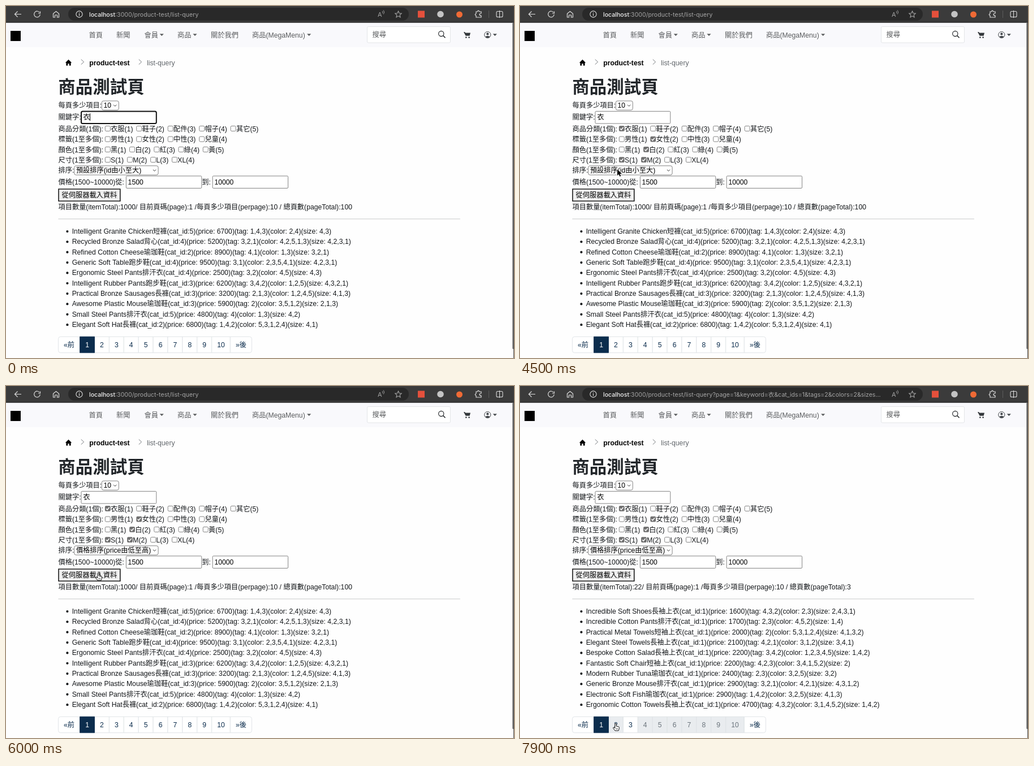
An HTML page with a canvas that plays this animation: 898x623 px, repeating every 8 s.

```html
<!DOCTYPE html>
<html lang="zh-Hant">
<head>
<meta charset="utf-8">
<title>商品測試頁</title>
<style>
html, body { margin: 0; width: 100%; height: 100%; overflow: hidden; background: #fefefe; }
canvas { display: block; width: 898px; height: 623px; }
</style>
</head>
<body>
<canvas id="stage" width="898" height="623"></canvas>
<script>
const stage = document.getElementById('stage').getContext('2d');
const layer = new OffscreenCanvas(898, 623).getContext('2d');
let c = stage;
const LOOP = 8000, STEP = 100, EM = 12.23;
const SANS = '"Liberation Sans", "Noto Sans CJK TC", "Noto Sans CJK", sans-serif';
const UI = 'Inter, "Noto Sans CJK TC", "Noto Sans CJK", sans-serif';
const INK = '#14171a', NAVY = '#0c2d4d', GREY = '#767676';

// name | category | price | tags | colours | sizes
const ALL = [
  'Intelligent Granite Chicken短褲|5|6700|1,4,3|2,4|4,3',
  'Recycled Bronze Salad背心|4|5200|3,2,1|4,2,5,1,3|4,2,3,1',
  'Refined Cotton Cheese瑜珈鞋|2|8900|4,1|1,3|3,2,1',
  'Generic Soft Table跑步鞋|4|9500|3,1|2,3,5,4,1|4,2,3,1',
  'Ergonomic Steel Pants排汗衣|4|2500|3,2|4,5|4,3',
  'Intelligent Rubber Pants跑步鞋|3|6200|3,4,2|1,2,5|4,3,2,1',
  'Practical Bronze Sausages長褲|3|3200|2,1,3|1,2,4,5|4,1,3',
  'Awesome Plastic Mouse瑜珈鞋|3|5900|2|3,5,1,2|2,1,3',
  'Small Steel Pants排汗衣|5|4800|4|1,3|4,2',
  'Elegant Soft Hat長褲|2|6800|1,4,2|5,3,1,2,4|4,1'
];
const FOUND = [
  'Incredible Soft Shoes長袖上衣|1|1600|4,3,2|2,3|2,4,3,1',
  'Incredible Cotton Pants排汗衣|1|1700|2,3|4,5,2|1,4',
  'Practical Metal Towels短袖上衣|1|2000|2|5,3,1,2,4|4,1,3,2',
  'Elegant Steel Towels長袖上衣|1|2100|4,2,1|3,1,2|3,4,1',
  'Bespoke Cotton Salad長袖上衣|1|2200|3,4,2|1,2,3,4,5|1,4,2',
  'Fantastic Soft Chair短袖上衣|1|2200|4,2,3|3,4,1,5,2|2',
  'Modern Rubber Tuna瑜珈衣|1|2400|2,3|3,2,5|3,2',
  'Generic Bronze Mouse排汗衣|1|2900|3,2,1|4,2,1|4,3,1,2',
  'Electronic Soft Fish瑜珈衣|1|2900|1,4,2|3,2,5|4,1,3',
  'Ergonomic Cotton Towels長袖上衣|1|4700|4,3,2|3,1,4,5,2|1,4,2'
];

// label, centre y, options, index -> time it gets checked
const FILTERS = [
  ['商品分類(1個):', 217, ['衣服(1)', '鞋子(2)', '配件(3)', '帽子(4)', '其它(5)'], { 0: 1200 }],
  ['標籤(1至多個):', 235.7, ['男性(1)', '女性(2)', '中性(3)', '兒童(4)'], { 1: 2400 }],
  ['顏色(1至多個):', 254, ['黑(1)', '白(2)', '紅(3)', '綠(4)', '黃(5)'], { 1: 2700 }],
  ['尺寸(1至多個):', 272.2, ['S(1)', 'M(2)', 'L(3)', 'XL(4)'], { 0: 4100, 1: 3200 }]
];
const SORTS = ['預設排序(id由小至大)', 'ID排序(id由大至小)', '價格排序(price由低至高)', '價格排序(price由高至低)'];

// pointer track: time, x, y
const TRACK = [
  [300, 214, 199], [600, 200, 226], [1000, 178, 215], [1300, 178, 215],
  [1500, 203, 243], [1700, 208, 254], [2200, 226, 239], [2300, 232, 236], [2400, 232, 236],
  [2600, 223, 253], [2700, 223, 254], [2900, 228, 265], [3100, 221, 272], [3200, 219, 273],
  [3300, 219, 273], [3600, 183, 273], [3700, 183, 273], [3900, 176, 270], [4200, 176, 270],
  [4500, 172, 289], [4700, 172, 289], [5200, 169, 325], [5600, 168, 327], [6000, 163, 331],
  [6300, 163, 331], [6900, 209, 385], [7100, 209, 385], [7800, 169, 596], [7900, 169, 597]
];

function text(s, x, y, color = INK, size = EM, weight = 400, family = SANS, align = 'left') {
  c.font = `${weight} ${size}px ${family}`;
  c.textAlign = align;
  c.fillStyle = color;
  c.fillText(s, x, y + size * 0.36);
}

function width(s, size = EM) {
  c.font = `400 ${size}px ${SANS}`;
  return c.measureText(s).width;
}

function box(x, y, w, h, r, fill, stroke, line = 1) {
  c.beginPath();
  c.roundRect(x, y, w, h, r);
  if (fill) { c.fillStyle = fill; c.fill(); }
  if (stroke) { c.strokeStyle = stroke; c.lineWidth = line; c.stroke(); }
}

function rect(x, y, w, h, color) {
  c.fillStyle = color;
  c.fillRect(x, y, w, h);
}

function lines(color, w, ...paths) {
  c.strokeStyle = color;
  c.lineWidth = w;
  for (const p of paths) c.stroke(new Path2D(p));
}

function ring(x, y, r, color, w, from = 0, to = 7) {
  c.beginPath();
  c.arc(x, y, r, from, to);
  c.strokeStyle = color;
  c.lineWidth = w;
  c.stroke();
}

function dot(x, y, r, color) {
  c.beginPath();
  c.arc(x, y, r, 0, 7);
  c.fillStyle = color;
  c.fill();
}

function shape(d, fill) {
  c.fillStyle = fill;
  c.fill(new Path2D(d));
}

function at(x, y, draw) {
  c.save();
  c.translate(x, y);
  draw();
  c.restore();
}

// draws a group on its own layer, then blends it in as a whole
function fade(alpha, draw) {
  c = layer;
  c.clearRect(0, 0, 898, 623);
  c.save();
  draw();
  c.restore();
  c = stage;
  c.globalAlpha = alpha;
  c.drawImage(layer.canvas, 0, 0);
  c.globalAlpha = 1;
}

function star(r1, r2) {
  let d = '';
  for (let i = 0; i < 10; i++) {
    const a = i * Math.PI / 5 - Math.PI / 2, r = i % 2 ? r2 : r1;
    d += (i ? 'L' : 'M') + r * Math.cos(a) + ' ' + r * Math.sin(a);
  }
  return d + 'Z';
}

function browserBar(t) {
  const pale = '#dcdcdc', dim = '#a5a5a5';
  rect(0, 0, 898, 29.5, '#3b3b3b');
  rect(0, 28.4, 898, 1.1, '#282828');
  box(110, 3, 602, 23, 11.5, '#292929');
  lines(pale, 1.2, 'M27 14.5H15.5M20.5 9.5L15.5 14.5L20.5 19.5', 'M60.5 9.5V13H57',
    'M83.5 13.5L88.5 9.5L93.5 13.5V20H90.5V16H86.5V20H83.5Z');
  ring(55, 14.5, 5.3, pale, 1.2, 0.1, 5.6);
  ring(129.5, 14.5, 5.6, pale, 1.1);
  lines(pale, 1.2, 'M129.5 13.6V17.6M129.5 11.3V12.5');
  text('localhost', 147, 14.7, '#f2f2f2', 10.6, 500, UI);
  const x = 147 + c.measureText('localhost').width;
  const query = t >= 6400 ? '?page=1&keyword=衣&cat_ids=1&tags=2&colors=2&sizes...' : '';
  text(':3000/product-test/list-query' + query, x, 14.7, dim, 10.6, 400, UI);
  text('A', 657, 15, dim, 11, 400, UI);
  ring(663, 11, 3, dim, 0.9, -0.7, 0.7);
  ring(663, 11, 5.5, dim, 0.9, -0.7, 0.7);
  at(693.5, 15, () => lines(dim, 1.1, star(6, 2.8)));
  box(728, 8.5, 12, 12, 0, '#e5503c');
  dot(768, 14.5, 5.8, '#c4c4c4');
  dot(801.5, 15, 5.5, '#ef6a35');
  lines(pale, 1.2, 'M831 10H833.5Q834 7.5 836 8.5L836.5 10H840V13Q837 13 837 15Q837 17 840 17V20H831V17Q829 16.5 829.5 14.5L831 13.5Z');
  rect(853, 8, 1, 13, '#5c5c5c');
  box(867, 9.5, 11, 10, 2, null, pale, 1.1);
  lines(pale, 1.1, 'M872.5 8V21');
}

function caret(x, color = '#5a5c5e') {
  shape(`M${x - 3.6} 49.2H${x + 3.6}L${x} 53Z`, color);
}

function navBar(dx) {
  const grey = '#5a5c5e';
  rect(0, 29.5, 898, 43, '#f9f9fc');
  box(8, 44, 18, 18, 0, '#000');
  [['首頁', 146.5], ['新聞', 195], ['會員', 244.5], ['商品', 303], ['關於我們', 362], ['商品(MegaMenu)', 435]]
    .forEach(([s, x]) => text(s, x, 51.2, grey));
  [275.3, 334, 535.7].forEach(x => caret(x));
  at(dx, 0, () => {
    box(638.5, 36.5, 147, 28.5, 2, '#fff', '#e3e5e8');
    text('搜尋', 647.5, 50.5, grey);
    ring(769.3, 49, 4.6, INK, 1.1);
    lines(INK, 1.4, 'M772.7 52.4L776.5 56.2');
    shape('M809 46H811.2L812 47.5H821L819.6 52.8H812.6Z', '#33373b');
    dot(813.3, 55.6, 1.3, '#33373b');
    dot(818.6, 55.6, 1.3, '#33373b');
    ring(851.3, 51, 5.6, '#44484c', 1);
    dot(851.3, 49.4, 2.1, '#44484c');
    shape('M847 54.5Q851.3 50.8 855.6 54.5Q851.3 58.6 847 54.5Z', '#44484c');
    caret(864.3, '#44484c');
  });
}

function checkbox(x, y, on) {
  if (!on) return box(x + 0.4, y - 4.6, 9, 9, 1.8, '#fff', GREY, 0.9);
  box(x, y - 5, 9.8, 9.8, 2, '#707070');
  lines('#fff', 1.5, `M${x + 2.2} ${y + 0.1}L${x + 4.1} ${y + 2.1}L${x + 7.7} ${y - 2.3}`);
}

function select(x, y, w, label) {
  box(x, y - 8, w, 16.2, 3, '#fff', GREY, 0.9);
  text(label, x + 3.2, y, '#000', EM, 500);
  const m = x + w - 6.6;
  lines('#333', 1, `M${m - 2.6} ${y - 1.2}L${m} ${y + 1.4}L${m + 2.6} ${y - 1.2}`);
}

function input(x, y, w, value, focus) {
  if (focus) box(x, y - 10.6, w, 21.6, 2.5, '#fff', '#101010', 2);
  else box(x, y - 10.6, w, 21.6, 1.5, '#fff', GREY, 0.9);
  text(value, x + 3.2, y, '#000', EM, 500);
}

function form(t, loaded) {
  shape('M104.8 100.5L110.5 94.8L116.2 100.5H114.6V105.5H111.8V102H109.2V105.5H106.4V100.5Z', '#000');
  lines('#75797d', 1, 'M132.8 94.5L137.6 99L132.8 103.5', 'M234.8 94.5L239.6 99L234.8 103.5');
  text('product-test', 147.3, 100.3, '#000', EM, 700);
  text('list-query', 249, 100.3, '#62676c');
  text('商品測試頁', 92.3, 143, '#212529', 30.5, 600);

  text('每頁多少項目:', 92.5, 176);
  select(169.3, 176, 30, '10');
  text('關鍵字:', 92.5, 197);
  input(133, 197, 132.8, '衣', t < 1100);
  if (t < 300 || (t >= 800 && t < 1100)) rect(148, 190, 1, 13, '#000');

  for (const [label, y, options, checks] of FILTERS) {
    text(label, 92.5, y + 0.3);
    let x = 174.9;
    options.forEach((s, i) => {
      checkbox(x, y, t >= checks[i]);
      text(s, x + 10.2, y + 0.3);
      x += 16.1 + width(s);
    });
  }

  text('排序:', 92.5, 290.8);
  select(120.7, 290.8, 148.4, SORTS[t >= 5700 ? 2 : 0]);
  text('價格(1500~10000)從:', 92.5, 311.5);
  input(212.4, 311.5, 133.4, '1500');
  text('到:', 346.2, 311.5);
  input(365.2, 311.5, 133.4, '10000');
  box(93, 324, 108.8, 21.2, 0, '#efefef', '#1c1c1c', 1.6);
  text('從伺服器載入資料', 147.4, 334.5, '#000', EM, 500, SANS, 'center');

  const [total, pages] = loaded ? [22, 3] : [1000, 100];
  text(`項目數量(itemTotal):${total}/ 目前頁碼(page):1 /每頁多少項目(perpage):10 / 總頁數(pageTotal):${pages}`, 92.5, 355.4);
  rect(92.4, 376.4, 710.4, 1, '#c8cacb');
}

function list(rows) {
  rows.forEach((row, i) => {
    const [name, cat, price, tags, colors, sizes] = row.split('|');
    const y = 398.6 + i * 18.35;
    dot(108.4, y + 0.4, 2.1, INK);
    text(`${name}(cat_id:${cat})(price: ${price})(tag: ${tags})(color: ${colors})(size: ${sizes})`, 116.7, y);
  });
}

function pager(loaded, p) {
  let x = 92.5;
  const cells = ['«前', ...Array.from({ length: 10 }, (_, i) => String(i + 1)), '»後'].map((s, i) => {
    const cell = { s, i, x, w: width(s) + 19.1 };
    x += cell.w;
    return cell;
  });
  const paint = ({ s, i, x, w }, fill, color, border) => {
    const r = i === 0 ? [4, 0, 0, 4] : i === 11 ? [0, 4, 4, 0] : 0;
    box(x, 585.3, w, 28.4, r, fill, border, 0.9);
    text(s, x + w / 2, 599.7, color, EM, 400, SANS, 'center');
  };
  for (const cell of cells) {
    const off = loaded && cell.i > 3 && cell.i < 11;
    const hover = cell.i === 2 && p && p.y > 585 && p.x > cell.x && p.x < cell.x + cell.w;
    paint(cell, off || hover ? '#e9ecef' : '#fff', off ? '#6c757d' : NAVY, '#dee2e6');
  }
  paint(cells[1], NAVY, '#fff', NAVY);
}

function spinner(t) {
  const a = (t - 6100) / 750 * 2 * Math.PI;
  ring(104, 401.9, 10.7, NAVY, 3.06, a + Math.PI / 4, a + Math.PI * 7 / 4);
}

function footer() {
  rect(0, 595.5, 898, 28, '#f9f9fc');
  text('台灣 © 2023 Talvok, Inc. 版權所有', 93, 616.8, '#5a5f64');
}

function menu(t, p) {
  if (t < 4600 || t >= 5800) return;
  const hot = t >= 5200 ? 2 : Math.max(0, Math.min(2, Math.floor((p.y - 282) / 19.8)));
  fade(t < 5500 ? 1 : t < 5600 ? 0.82 : t < 5700 ? 0.6 : 0.25, () => {
    c.shadowColor = 'rgba(0,0,0,.35)';
    c.shadowBlur = 5;
    c.shadowOffsetY = 1;
    box(113, 279, 171.3, 86.5, 5, '#424242');
    c.shadowColor = 'transparent';
    SORTS.forEach((s, i) => {
      const y = 291.8 + i * 19.8;
      if (i === hot) box(117.5, y - 9.8, 162.5, 19.6, 4, '#2c64ff');
      text(s, 132, y, '#fff', 12.5, 500, UI);
    });
    lines('#fff', 1.4, 'M121 292L123.4 295L127.5 288.5');
  });
}

function pointer(t) {
  if (t < TRACK[0][0]) return null;
  const i = TRACK.findIndex(k => k[0] > t);
  if (i < 0) {
    const [, x, y] = TRACK[TRACK.length - 1];
    return { x, y };
  }
  const [t0, x0, y0] = TRACK[i - 1], [t1, x1, y1] = TRACK[i];
  const k = (t - t0) / (t1 - t0), e = k * k * (3 - 2 * k);
  return { x: x0 + (x1 - x0) * e, y: y0 + (y1 - y0) * e };
}

function drawPointer(t, p, loading) {
  const inside = (x, y, w, h) => p.x > x && p.x < x + w && p.y > y && p.y < y + h;
  const open = t >= 4600 && t < 5800;
  const hand = !open && (inside(92, 323, 112, 23) || (!loading && inside(92, 585, 342, 29)));
  const beam = !open && (inside(132, 186, 134, 22) || (!loading && inside(117, 389, 430, 184)));
  at(p.x, p.y, () => {
    c.lineJoin = 'round';
    if (beam) {
      const d = 'M-2.5 -6.5Q0 -6.5 0 -5Q0 -6.5 2.5 -6.5M0 -5V5M-2.5 6.5Q0 6.5 0 5Q0 6.5 2.5 6.5';
      lines('#fff', 2.4, d);
      lines('#111', 1.1, d);
    } else if (hand) {
      const d = 'M-1.2 1Q0 -.8 1.2 1V5L5.4 6Q6.5 6.3 6.4 7.6L6 10.6L5 13H-1L-4.4 8.6Q-4.6 7 -3 7.3L-1.2 8.8Z';
      shape(d, '#fff');
      lines('#111', 1, d);
      lines('#111', 0.7, 'M1.2 8.5V11M3.2 8.5V11');
    } else {
      const d = 'M0 0V11.2L2.6 8.8L4.4 12.8L6.3 12L4.6 8H8.1Z';
      lines('#fff', 1.8, d);
      shape(d, '#000');
    }
  });
}

function draw(t) {
  const loading = t >= 6100 && t < 6800, loaded = t >= 6800;
  const p = pointer(t);
  rect(0, 0, 898, 623, '#fefefe');
  navBar(loading ? 5.4 : 0);
  at(loading ? 2.7 : 0, 0, () => {
    form(t, loaded);
    if (loading) spinner(t);
    else {
      list(loaded ? FOUND : ALL);
      pager(loaded, p);
    }
  });
  if (loading) footer();
  rect(897, 29, 1, 594, '#4a4a4a');
  if (!loading) box(895.4, 30, 2.6, 577, 1.2, '#5e5e5e');
  browserBar(t);
  if (p) {
    menu(t, p);
    drawPointer(t, p, loading);
  }
}

function tick() {
  const t = performance.now() % LOOP;
  draw(Math.floor(t / STEP) * STEP);
  requestAnimationFrame(tick);
}
tick();
</script>
</body>
</html>
```
